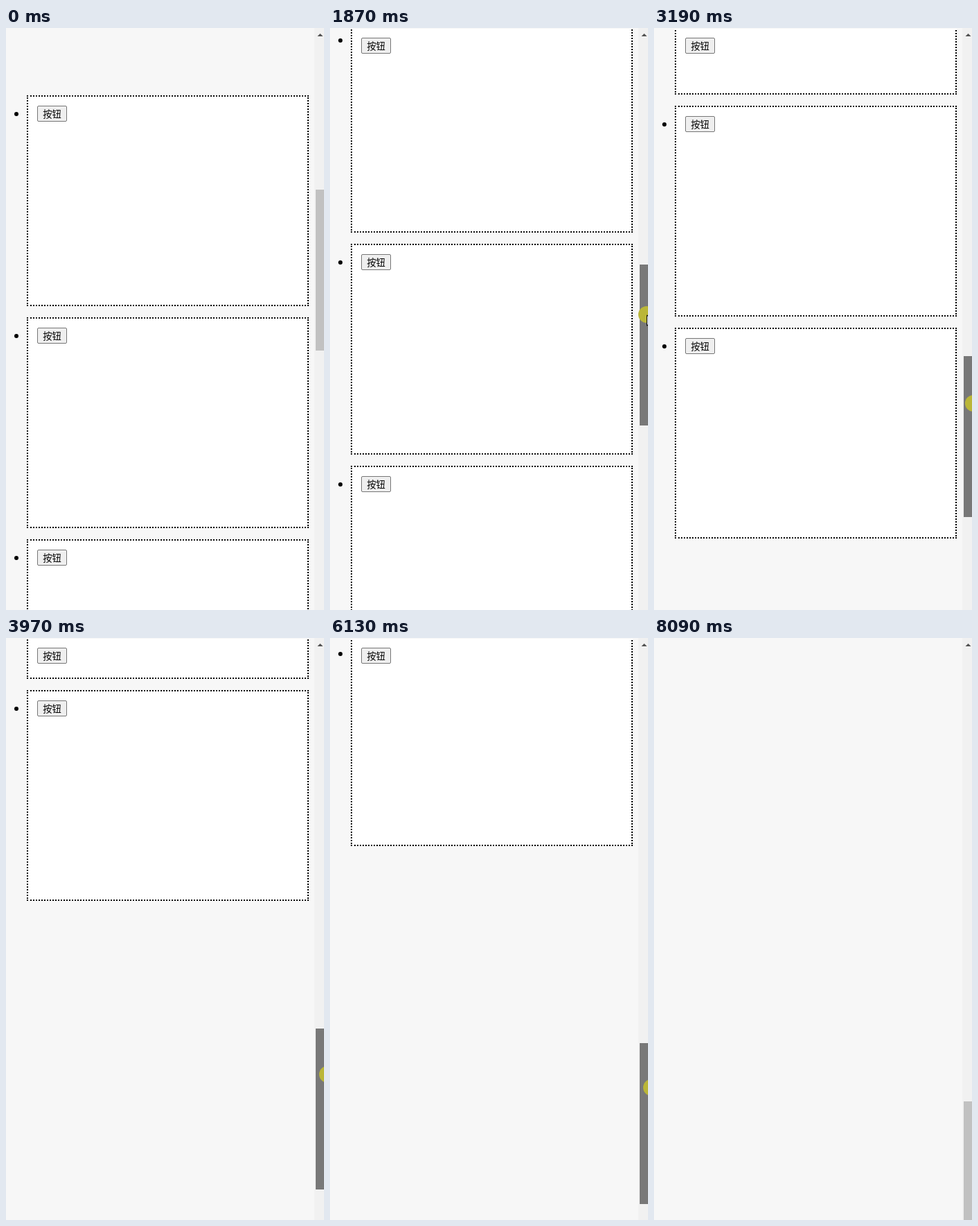
Animation, 459 px wide and 839 px high, one loop 8.47 s. Source, as an HTML page:

```html
<!DOCTYPE html>
<html lang="zh">
<head>
<meta charset="utf-8">
<title>Sticky buttons</title>
<style>
  html, body { margin: 0; width: 100%; height: 100%; overflow: hidden; background: #f7f7f7; }
  .stage { position: absolute; left: 0; top: 0; width: 459px; height: 839px; overflow: hidden; }
  .view { position: absolute; left: 0; top: 1px; width: 445px; height: 838px; overflow: hidden; }
  .list { position: absolute; left: 0; top: -1px; width: 445px; }
  .item { position: absolute; left: 30px; width: 407px; height: 304px; box-sizing: border-box;
    border: 2px dotted #000; background: #fff; }
  .item::before { content: ""; position: absolute; left: -20px; top: 22px; width: 6px; height: 6px;
    border-radius: 50%; background: #000; }
  .btn { position: absolute; left: 13px; top: -2px; width: 43px; height: 23px; box-sizing: border-box;
    border: 1px solid #767676; border-radius: 2px; background: #efefef; color: #000;
    font: 300 13.333px/21px "Noto Sans CJK SC", "Noto Sans CJK", sans-serif;
    text-align: center; white-space: nowrap; }
  .track { position: absolute; left: 445px; top: 0; width: 14px; height: 839px; background: #f1f1f1; }
  .track svg { position: absolute; left: 4px; top: 7px; }
  .thumb { position: absolute; left: 2px; top: 0; width: 13px; height: 232px; }
  .halo { position: absolute; left: -12px; top: -12px; width: 24px; height: 24px;
    border-radius: 50%; background: #bab638; }
  .arrow { position: absolute; left: 0; top: 0; }
</style>
</head>
<body>
<div class="stage">
  <div class="view"><div class="list"></div></div>
  <div class="track">
    <svg width="9" height="5"><path d="M4.5 1 8.5 5H.5z" fill="#505050"/></svg>
    <div class="thumb"></div>
  </div>
  <div class="halo"></div>
  <svg class="arrow" width="12" height="19"><path d="M.5 .8V16.2L4 12.8l2.6 5.7 2.2-1L6.3 12h5z" fill="#fff" stroke="#000"/></svg>
</div>
<script>
  const LOOP = 8470, STEP = 78, PITCH = 320, FIRST = 97, COUNT = 5;
  const HOVER = 690, PRESS = 990, RELEASE = 7860, LEAVE = 8090;

  // Key points of the drag: time, scroll offset
  const scrollKeys = [
    [1230, 0], [1870, 426], [2500, 686], [3970, 1302], [4820, 1503], [4970, 1503],
    [5200, 1302], [5520, 1253], [5590, 1253], [6130, 1381], [7300, 1714]
  ];
  // Pointer while dragging: distance below the thumb's top, and x
  const gripKeys = [[1870, 72], [3970, 66], [5200, 64], [6450, 64], [7710, 81]];
  const dragXKeys = [[PRESS, 450], [1870, 457], [2500, 458], [3970, 464]];

  // Free pointer: from, until, start point, end point
  const glides = [
    [70, 150, [426, 725], [426, 725]],
    [610, PRESS, [456, 322], [448, 305]],
    [RELEASE, LEAVE, [456, 749], [429, 739]]
  ];

  const $ = s => document.querySelector(s);
  const list = $(".list"), thumb = $(".thumb"), halo = $(".halo"), arrow = $(".arrow");

  const buttons = Array.from({ length: COUNT }, (_, i) => {
    const item = document.createElement("div");
    const btn = document.createElement("div");
    item.className = "item";
    item.style.top = FIRST + i * PITCH + "px";
    btn.className = "btn";
    btn.textContent = "按钮";
    item.append(btn);
    list.append(item);
    return btn;
  });

  const move = (el, x, y) => { el.style.transform = `translate(${x}px, ${y}px)`; };
  const show = (el, on) => { el.style.visibility = on ? "visible" : "hidden"; };
  const clamp = (v, lo, hi) => Math.min(hi, Math.max(lo, v));

  // Progress from t0 to t1 in even held steps
  function stepped(t, t0, t1) {
    const n = Math.max(1, Math.round((t1 - t0) / STEP));
    return Math.floor((t - t0) / (t1 - t0) * n + 1e-6) / n;
  }

  function at(keys, t) {
    const i = keys.findIndex(k => k[0] > t);
    if (i === 0) return keys[0][1];
    if (i < 0) return keys[keys.length - 1][1];
    const [t0, a] = keys[i - 1], [t1, b] = keys[i];
    return Math.round(a + (b - a) * stepped(t, t0, t1));
  }

  function draw(t) {
    const scroll = at(scrollKeys, t);
    const thumbY = Math.round(232.97 + scroll / 3.9395);
    const pressed = t >= PRESS && t < RELEASE;
    const hover = t >= HOVER && t < LEAVE - STEP;

    move(list, 0, -scroll);
    buttons.forEach((btn, i) => {
      const top = FIRST + i * PITCH - scroll;
      move(btn, 0, clamp(14 - top, 15, 265));
    });
    move(thumb, 0, thumbY);
    thumb.style.background = pressed ? "#787878" : hover ? "#a8a8a8" : "#c1c1c1";

    const glide = glides.find(g => t >= g[0] && t < g[1]);
    show(halo, pressed);
    show(arrow, pressed || glide);
    if (pressed) {
      const x = at(dragXKeys, t), y = thumbY + at(gripKeys, t);
      move(halo, x, y);
      move(arrow, x, y);
    } else if (glide) {
      const [from, until, a, b] = glide;
      const p = stepped(t, from, until);
      move(arrow, ...a.map((v, k) => Math.round(v + (b[k] - v) * p)));
    }
  }

  function tick() {
    draw(performance.now() % LOOP);
    requestAnimationFrame(tick);
  }
  tick();
</script>
</body>
</html>
```
